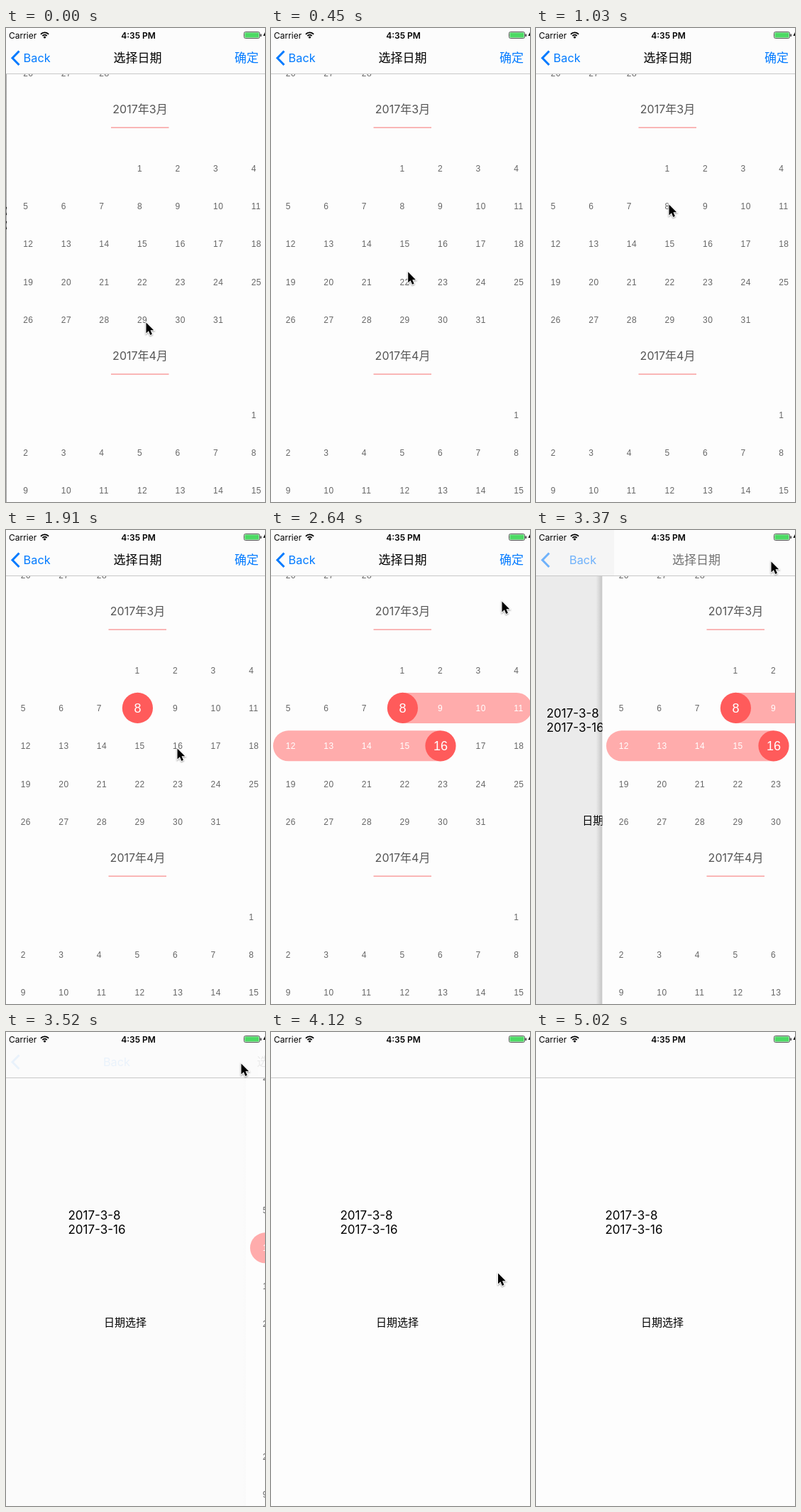
These frames come from a looping animation (365x667 px, 5350 ms). An HTML page with a canvas:

```html
<!DOCTYPE html>
<html lang="zh">
<head>
<meta charset="utf-8">
<style>
html, body { margin: 0; width: 365px; height: 667px; overflow: hidden; background: #fdfdfd; }
canvas { display: block; }
</style>
</head>
<body>
<canvas id="stage" width="365" height="667"></canvas>
<script>
const c = document.getElementById('stage').getContext('2d');
const W = 365, H = 667, PAGE = 375, LOOP = 5350, COL = PAGE / 7, ROW = 53.4;
const EDGE = -2.5; // left side of the page, cropped when at rest
const UI = 'Inter, "Noto Sans CJK SC", "Noto Sans CJK", sans-serif';
const NUM = '"Liberation Sans", Arial, sans-serif';
const BLUE = '#007aff', RED = '#ff5b5b', PINK = '#ffacac';

// Each key is [step, ...values]
const slide = [[0, 3.5], [1, 0], [22, 0], [23, 96], [24, 341], [25, PAGE]];
const barMove = [[22, 0], [23, .156], [24, .78], [25, 1]];
const barFade = [[22, 1], [23, .55], [24, .07], [25, 0]];
const pointer = [[0, 197, 414], [7, 187, 248], [10, 187, 248], [13, 241, 307], [14, 241, 307],
  [16, 312, 128], [18, 325, 100], [20, 331, 44], [25, 331, 44], [31, 308, 634],
  [32, 282, 585], [33, 256, 648], [34, 250, 690]];

function at(keys, k) {
  const i = keys.findIndex(key => key[0] >= k);
  if (i < 0) return keys[keys.length - 1].slice(1);
  if (i === 0) return keys[0].slice(1);
  const a = keys[i - 1], b = keys[i], p = (k - a[0]) / (b[0] - a[0]);
  return a.slice(1).map((v, j) => v + (b[j + 1] - v) * p);
}

function text(s, x, y, font, color = '#000', align = 'left') {
  c.font = font;
  c.fillStyle = color;
  c.textAlign = align;
  c.fillText(s, x, y);
}

function rect(x, y, w, h, color) {
  c.fillStyle = color;
  c.fillRect(x, y, w, h);
}

function disc(x, y, r, color) {
  c.fillStyle = color;
  c.beginPath();
  c.arc(x, y, r, 0, 7);
  c.fill();
}

function pill(x, y, w, radii) {
  c.fillStyle = PINK;
  c.beginPath();
  c.roundRect(x, y - 21.5, w, 43, radii);
  c.fill();
}

const colX = i => 24.7 + COL * i;

// top is the middle of the first row of days
function month(name, top, first, days, picked = [], ranged = false) {
  if (name) {
    text(name, 185.5, top - 77.5, '16px ' + UI, '#555', 'center');
    rect(144.5, top - 58, 81.5, 1.5, '#f9a0a0');
  }
  if (ranged) {
    pill(colX(3), top + ROW - .4, colX(6) + 21.5 - colX(3), [0, 21.5, 21.5, 0]);
    pill(3, top + 2 * ROW - .4, colX(4) - 3, [21.5, 0, 0, 21.5]);
  }
  for (let d = 1; d <= days; d++) {
    const cell = first + d - 1, x = colX(cell % 7), y = top + ROW * Math.floor(cell / 7);
    if (picked.includes(d)) {
      disc(x, y - .4, 21.6, RED);
      text(d, x, y + 6, '18px ' + NUM, '#fff', 'center');
    } else {
      const inside = ranged && d > 8 && d < 16;
      c.letterSpacing = '.5px';
      text(d, x - 4, y + 4.1, '12px ' + NUM, inside ? '#fff' : '#666');
      c.letterSpacing = '0px';
    }
  }
}

function calendar(off, k) {
  c.save();
  c.translate(off, 0);
  const shade = c.createLinearGradient(EDGE - 9, 0, EDGE, 0);
  shade.addColorStop(0, 'rgba(0,0,0,0)');
  shade.addColorStop(1, `rgba(0,0,0,${.3 * (1 - off / PAGE) ** 2})`);
  rect(EDGE - 9, 0, 9, H, shade);
  rect(EDGE, 0, PAGE, H, '#fdfdfd');
  const picked = [];
  if (k >= 10) picked.push(8);
  if (k >= 14) picked.push(16);
  month('', 197.4 - 347, 3, 28);
  month('2017年3月', 197.4, 3, 31, picked, k >= 14);
  month('2017年4月', 544.4, 6, 30);
  c.restore();
}

function home(off) {
  const x = -.297 * (PAGE - off);
  rect(0, 0, W, H, '#fdfdfd');
  text('2017-3-8', x + 97.5, 264, '17px ' + UI);
  text('2017-3-16', x + 97.5, 284, '17px ' + UI);
  text('日期选择', x + 178, 414, '15px ' + UI, '#000', 'center');
  rect(0, 0, W, H, `rgba(0,0,0,${.095 * (1 - off / PAGE)})`);
}

function statusBar() {
  text('Carrier', 4, 14.5, '12px ' + UI);
  text('4:35 PM', 186.5, 14.5, '600 12px ' + UI, '#000', 'center');
  c.strokeStyle = '#000';
  c.lineWidth = 1.8;
  for (const r of [4.3, 7.6]) {
    c.beginPath();
    c.arc(54.5, 14, r, -Math.PI * .76, -Math.PI * .24);
    c.stroke();
  }
  disc(54.5, 13, 1.6, '#000');
  c.lineWidth = 1;
  c.strokeStyle = '#555';
  c.beginPath();
  c.roundRect(335.5, 5.5, 22, 9, 2);
  c.stroke();
  rect(336.5, 6.5, 20, 7, '#4cd964');
  rect(358.5, 8.5, 1.5, 3.5, '#333');
  c.fillStyle = '#000';
  c.beginPath();
  c.moveTo(365, 6);
  c.lineTo(362.5, 11);
  c.lineTo(365, 11);
  c.fill();
}

function navBar(off, k) {
  const [move] = at(barMove, k), [fade] = at(barFade, k);
  rect(0, 0, W, 64, '#fcfcfc');
  if (off > 4 && off < PAGE) rect(0, 0, off + 14, 64, `rgba(0,0,0,${.035 * (1 - off / PAGE)})`);
  rect(0, 64, W, 1, '#c8c8c8');
  statusBar();
  c.globalAlpha = fade;
  c.strokeStyle = BLUE;
  c.lineWidth = 3;
  c.beginPath();
  c.moveTo(18.5, 32.5);
  c.lineTo(9, 42.2);
  c.lineTo(18.5, 52);
  c.stroke();
  text('Back', 43.6 + 144 * move, 48, '16.3px ' + UI, BLUE, 'center');
  text('选择日期', 185.5 + 259 * move, 48, '500 17px ' + UI, '#000', 'center');
  c.globalAlpha = 1;
  if (k < 23) text('确定', 339, 48, '17px ' + UI, BLUE, 'center');
}

function cursor(x, y) {
  const shape = [[0, 0], [0, 15], [3.4, 11.8], [5.8, 17.4], [8.4, 16.3], [6, 10.8], [10.7, 10.8]];
  c.save();
  c.translate(x + .5, y + .5);
  c.beginPath();
  shape.forEach(p => c.lineTo(...p));
  c.closePath();
  c.lineWidth = 2;
  c.strokeStyle = '#fff';
  c.shadowColor = 'rgba(0,0,0,.4)';
  c.shadowBlur = 2;
  c.shadowOffsetY = 1;
  c.stroke();
  c.shadowColor = 'transparent';
  c.fillStyle = '#000';
  c.fill();
  c.restore();
}

function draw(now) {
  const t = now % LOOP;
  const k = t < 3520 ? Math.floor(t / 146.5) : Math.min(34, 24 + Math.floor((t - 3520) / 150));
  const [off] = at(slide, k);
  home(off);
  if (off < PAGE) calendar(off, k);
  navBar(off, k);
  cursor(...at(pointer, k));
}

const start = performance.now();
function tick() {
  draw(performance.now() - start);
  requestAnimationFrame(tick);
}
tick();
</script>
</body>
</html>
```
